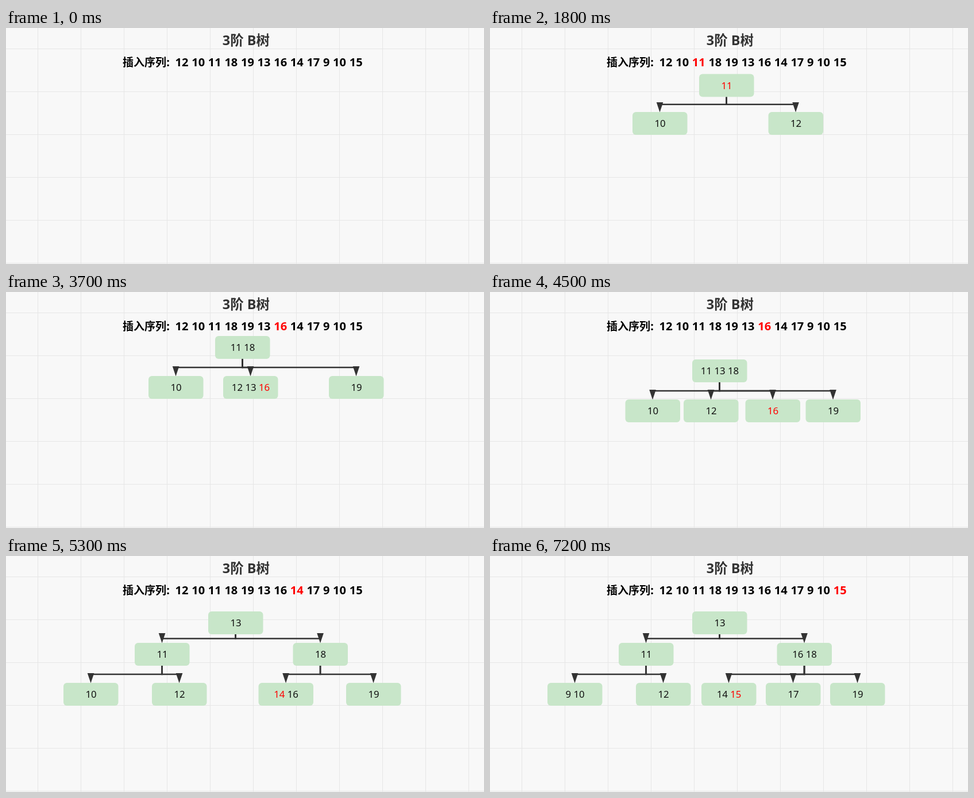
An HTML page that plays this animation: 832 px wide and 413 px high, repeating every 7700 ms.

```html
<!DOCTYPE html>
<html lang="zh">
<head>
<meta charset="utf-8">
<title>3阶 B树</title>
<style>
html, body { margin: 0; width: 100%; height: 100%; overflow: hidden; background: #f8f8f8; }
svg { display: block; width: 832px; height: 413px; }
text { font-family: "Noto Sans", "Noto Sans CJK SC", "Noto Sans CJK", sans-serif; white-space: pre; }
.head { font-weight: 700; font-size: 20px; }
.mid { text-anchor: middle; }
.key { font-size: 16.8px; fill: #111; }
</style>
</head>
<body>
<svg viewBox="0 0 832 413">
  <rect width="832" height="413" fill="#f8f8f8"/>
  <path id="grid" stroke="#e6e6e6" fill="none"/>
  <text class="head mid" x="417.8" y="30" style="font-size:23.4px" fill="#333">3阶 B树</text>
  <text class="head" x="203" y="67" style="font-size:19px">插入序列</text>
  <text class="head" x="279.3" y="67">:</text>
  <g id="seq"></g>
  <g id="tree"></g>
</svg>
<script>
const LOOP = 7700, STEP = 100, W = 95.5, H = 40, HALF = W / 2;
const $ = id => document.getElementById(id);
const values = '12 10 11 18 19 13 16 14 17 9 10 15'.split(' ');

// set: id -> changed fields of a node; from: where a new node splits off;
// rise: key that moves up into a parent, which shows it once it arrives
const scenes = [
  { t: 0, hot: -1, set: {} },
  { t: 300, hot: 0, set: { a: { s: '12', x: 364, y: 80.5 } } },
  { t: 600, hot: 1, set: { a: { s: '10 12' } } },
  { t: 900, hot: 2, set: { a: { s: '10 11 12' } } },
  { t: 1200, hot: 2, steps: 7, set: {
    a: { s: '11' },
    b: { s: '10', x: 248, y: 147, up: 'a', from: 'a' },
    c: { s: '12', x: 484.5, y: 147, up: 'a', from: 'a' } } },
  { t: 2100, hot: 3, set: { c: { s: '12 18' } } },
  { t: 2400, hot: 4, set: { c: { s: '12 18 19' } } },
  { t: 2700, hot: 4, steps: 5, rise: { s: '18', from: 'c', to: 'a', x: 420, y: 77 }, set: {
    a: { s: '11 18', y: 77 },
    c: { s: '12', x: 378 },
    d: { s: '19', x: 562, y: 147, up: 'a', from: 'c' } } },
  { t: 3400, hot: 5, set: { c: { s: '12 13' } } },
  { t: 3700, hot: 6, set: { c: { s: '12 13 16' } } },
  { t: 4000, hot: 6, steps: 4, rise: { s: '13', from: 'c', to: 'a', x: 364, y: 77 }, set: {
    a: { s: '11 13 18' },
    c: { s: '12', x: 349.5 },
    e: { s: '16', x: 457, y: 147, up: 'a', from: 'c' } } },
  { t: 4400, hot: 6, steps: 2, set: {
    a: { x: 352, y: 118 },
    b: { x: 235.5, y: 188 }, c: { x: 337, y: 188 },
    e: { x: 444.5, y: 188 }, d: { x: 549.5, y: 188 } } },
  { t: 4600, hot: 6, steps: 2, set: {
    a: { s: '13', y: 97 },
    l: { s: '11', x: 257, y: 152, up: 'a', from: 'a' },
    r: { s: '18', x: 499.5, y: 152, up: 'a', from: 'a' },
    b: { x: 202, y: 222, up: 'l' }, c: { x: 311, y: 222, up: 'l' },
    e: { x: 442, y: 222, up: 'r' }, d: { x: 556, y: 222, up: 'r' } } },
  { t: 4800, hot: 6, steps: 3, set: {
    l: { x: 224 }, b: { x: 100 }, c: { x: 254 }, e: { x: 439.5 }, d: { x: 592 } } },
  { t: 5300, hot: 7, set: { e: { s: '14 16' } } },
  { t: 5600, hot: 8, set: { e: { s: '14 16 17' } } },
  { t: 5900, hot: 8, steps: 5, rise: { s: '16', from: 'e', to: 'r', x: 470, y: 152 }, set: {
    r: { s: '16 18' },
    e: { s: '14', x: 368 },
    g: { s: '17', x: 480, y: 222, up: 'r', from: 'e' } } },
  { t: 6600, hot: 9, set: { b: { s: '9 10' } } },
  { t: 6900, hot: 10, set: {} },
  { t: 7200, hot: 11, set: { e: { s: '14 15' } } }
];

// Carry unchanged nodes forward so every scene knows its start and end.
let last = {};
for (const sc of scenes) {
  sc.old = last;
  sc.now = { ...last };
  for (const id in sc.set) sc.now[id] = { ...last[id], ...sc.set[id] };
  last = sc.now;
}

const mix = (a, b, p) => a + (b - a) * p;
const red = on => on ? ' fill="#f00"' : '';

function box(n, hot) {
  const keys = n.s.split(' ').map(k => `<tspan${red(k === hot)}>${k}</tspan>`).join(' ');
  return `<rect x="${n.x}" y="${n.y}" width="${W}" height="${H}" rx="6" fill="#c8e6c9"/>` +
    `<text class="key mid" x="${n.x + HALF + 0.3}" y="${n.y + 26}">${keys}</text>`;
}

function edge(top, kid) {
  const x = top.x + HALF - 0.2, y = top.y + H, cx = kid.x + HALF - 0.2, my = (y + kid.y) / 2;
  return `<path d="M${x} ${y}V${my}H${cx}V${kid.y - 10}" fill="none" stroke="#333" stroke-width="2.6"/>` +
    `<path d="M${cx - 5.8} ${kid.y - 17}h11.6L${cx} ${kid.y + 0.5}z" fill="#333"/>`;
}

function drawTree(sc, p) {
  const hot = values[sc.hot], nodes = {}, done = p === 1;
  for (const id in sc.now) {
    const n = sc.now[id], start = sc.old[id] || sc.old[n.from] || n;
    const wait = !done && sc.rise && sc.rise.to === id;
    nodes[id] = {
      s: wait ? start.s : n.s, up: n.up,
      x: mix(start.x, n.x, p), y: mix(start.y, n.y, p),
      linked: n.up && (done || sc.old[id])
    };
  }
  const all = Object.values(nodes), boxes = [...all];
  if (sc.rise && !done) {
    const r = sc.rise, o = sc.old[r.from];
    boxes.push({ s: r.s, x: mix(o.x, r.x, p), y: mix(o.y, r.y, p) });
  }
  boxes.sort((a, b) => b.y - a.y);
  $('tree').innerHTML =
    all.filter(n => n.linked).map(n => edge(nodes[n.up], n)).join('') +
    boxes.map(n => box(n, hot)).join('');
}

function drawSeq(hot) {
  let x = 294.6;
  $('seq').innerHTML = values.map((v, i) => {
    const s = `<text class="head" x="${x}" y="67"${red(i === hot)}>${v}</text>`;
    x += v.length * 11.5 + 5.6;
    return s;
  }).join('');
}

let shown = '';
function render(ms) {
  const t = ms % LOOP;
  const i = scenes.findLastIndex(s => s.t <= t), sc = scenes[i];
  const p = Math.min(1, (Math.floor((t - sc.t) / STEP) + 1) / (sc.steps || 1));
  const key = i + ':' + p;
  if (key === shown) return;
  shown = key;
  drawSeq(sc.hot);
  drawTree(sc, p);
}

let grid = '';
for (let x = 55.5; x < 832; x += 75) grid += `M${x} 0V413`;
for (let y = 36.5; y < 413; y += 75) grid += `M0 ${y}H832`;
$('grid').setAttribute('d', grid);

const begin = performance.now();
function tick() {
  render(performance.now() - begin);
  requestAnimationFrame(tick);
}
tick();
</script>
</body>
</html>
```
